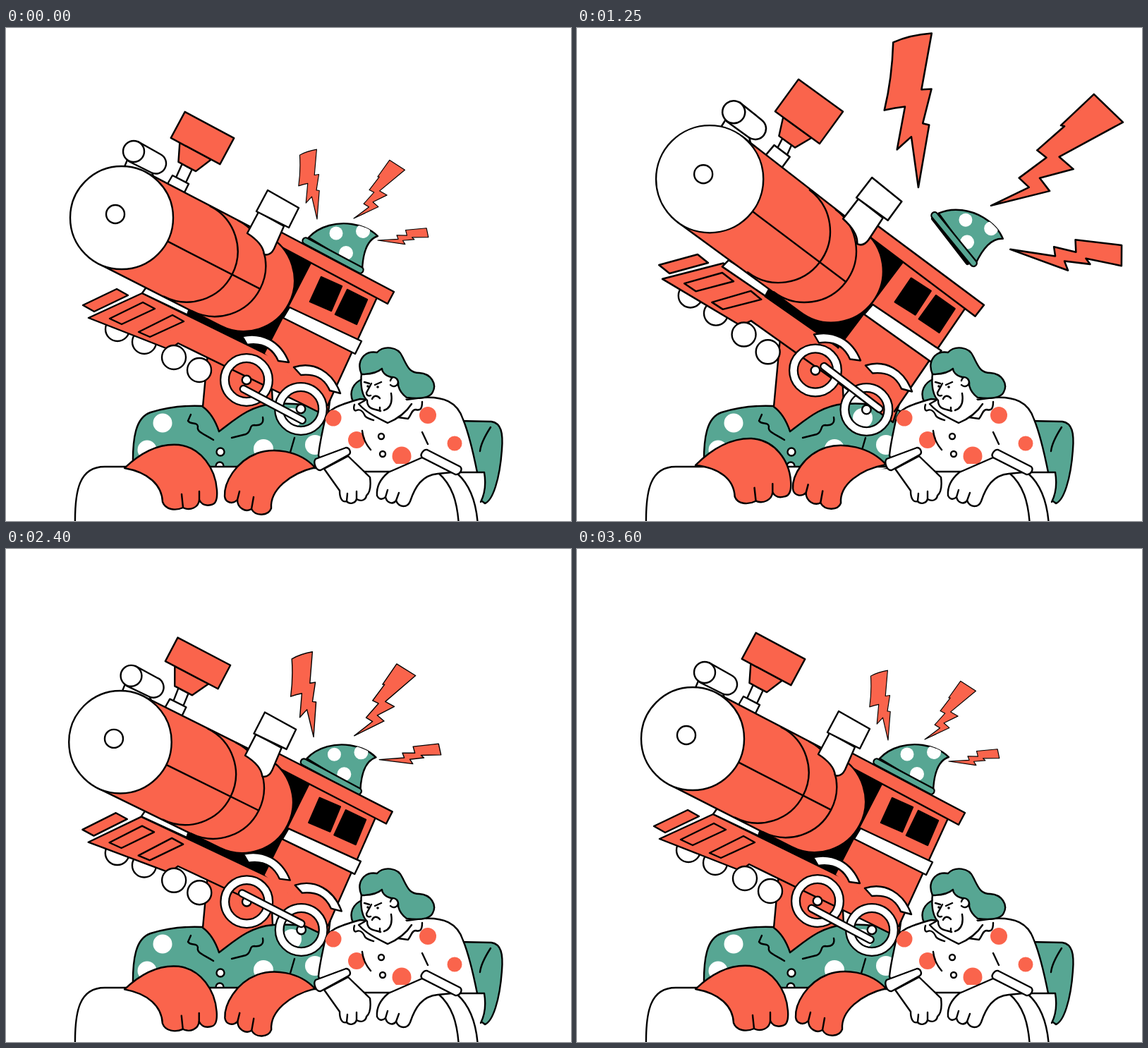
An HTML page for the animation above (3.65 s loop, 801x699 px).

```html
<!DOCTYPE html>
<html lang="en">
<head>
<meta charset="utf-8">
<title>Snoring engine</title>
<style>
html, body { margin: 0; width: 100%; height: 100%; overflow: hidden; background: #fff; }
svg { display: block; width: 801px; height: 699px; }
.ink { fill: none; stroke: #000; stroke-width: 2.4; stroke-linejoin: round; stroke-linecap: round; }
.red { fill: #fa644c; }
.teal { fill: #57a693; }
.white { fill: #fff; }
.black { fill: #000; }
.flat { stroke: none; }
</style>
</head>
<body>
<svg viewBox="0 0 801 699" class="ink">
  <defs>
    <clipPath id="shirtClip"><path d="M180,624C179,580 184,552 205,545C230,537 258,535 279,536L378,533C410,531 440,535 458,543L448,624Z"/></clipPath>
    <clipPath id="hatClip"><path d="M429,297C445,280 470,275 490,278C510,281 520,288 527,295C512,300 506,318 505,343Z"/></clipPath>
    <clipPath id="blouseClip"><path d="M452,556C447,580 444,592 443,606L455,618H662L640,530L590,524H500C470,535 456,540 452,556Z"/></clipPath>
  </defs>

  <g id="bolts"></g>

  <!-- pyjama shirt and neck -->
  <path class="teal" d="M180,624C179,580 184,552 205,545C230,537 258,535 279,536L378,533C410,531 440,535 458,543L448,624Z"/>
  <g class="white flat" clip-path="url(#shirtClip)">
    <circle cx="222" cy="560" r="13.5"/><circle cx="200" cy="598" r="13.5"/><circle cx="365" cy="597" r="14"/>
    <circle cx="405" cy="553" r="14"/><circle cx="438" cy="591" r="14"/>
  </g>
  <path d="M262,548L258,557C262,563 271,558 272,565C270,573 280,575 294,584M364,552C366,561 360,564 352,563C344,563 349,572 340,576L320,581M409,581L402,605"/>
  <circle class="white" cx="304" cy="601" r="5.5"/><circle class="white" cx="303" cy="621" r="5.5"/>
  <path class="red" d="M288,440L279,537C290,545 298,560 302,572C325,555 345,536 378,533L376,490Z"/>

  <!-- engine -->
  <g id="hat">
    <path stroke-width="6" d="M425,307L494,346"/>
    <path class="teal" d="M429,297C445,280 470,275 490,278C510,281 520,288 527,295C512,300 506,318 505,343Z"/>
    <g class="white flat" clip-path="url(#hatClip)">
      <circle cx="468" cy="291" r="9.5"/><circle cx="506" cy="288" r="10"/><circle cx="482" cy="319" r="10"/>
    </g>
    <path stroke-width="11.5" d="M425,302L502,343"/>
    <path stroke="#57a693" stroke-width="7" d="M425,302L502,343"/>
  </g>
  <g id="smallBack"></g>
  <g id="frame">
    <path class="red" d="M109,393L157,370L173,379L125,402Z"/>
    <path class="red" d="M117,411L193,376L366,461L462,508L456,551L416,531L244,447L232,456Z"/>
    <path d="M147,412L194,389L211,398L164,420ZM188,431L236,407L252,416L204,438Z"/>
  </g>
  <path class="white" id="tube"/><path class="red" id="cone"/><path class="red" id="box"/>
  <g id="cab">
    <path class="white" d="M193,376L200,366L266,394L258,407Z"/>
    <path class="black" d="M262,392L380,300L432,333L367,461L257,407Z"/>
    <path class="red flat" d="M432,333L526,382L456,535L366,461Z"/>
    <path d="M432,333L366,461M526,382L456,535"/>
    <path class="red" d="M389,289L550,374L541,391L380,305Z"/>
    <path class="white" d="M402,396L504,444L495,462L393,411Z"/>
    <path class="black" d="M447,353L476,366L461,401L431,388ZM484,371L512,385L497,420L467,406Z"/>
  </g>
  <g id="base"><path class="white" d="M236,209L259,221L249,241L226,226Z"/></g>
  <g id="whistle">
    <path class="white" d="M172,187L167,199L212,218L206,203Z"/>
    <path class="white" d="M187,161L219,179A14.5,14.5 0 0 1 206,205L174,189Z"/>
    <circle class="white" cx="181" cy="175" r="15"/>
  </g>
  <path class="red" id="boiler"/>
  <path id="seams"/>
  <circle class="white" id="face"/>
  <circle class="white" id="lamp" r="13"/>
  <g id="dome">
    <path class="white" d="M358,261L342,291C356,300 365,310 366,321C373,323 377,319 380,313L394,281Z"/>
    <path class="white" d="M371,230L415,255L401,283L355,260Z"/>
  </g>
  <g id="smallFront"></g>
  <g id="fenders">
    <path class="white" d="M335,437C362,431 389,443 401,474L386,472C377,452 362,446 342,449Z"/>
    <path class="white" d="M408,481C436,472 463,487 474,518L459,514C451,496 438,490 418,492Z"/>
  </g>
  <g id="wheels"></g>
  <path id="rodEdge" stroke-width="12"/>
  <path id="rod" stroke="#fff" stroke-width="7.4"/>

  <!-- cushion, blouse -->
  <path class="teal" d="M640,557L688,558C702,560 705,574 703,598C700,640 690,670 679,674L660,660Z"/>
  <path d="M687,566C678,580 673,590 672,600"/>
  <path class="teal" d="M507,497C491,503 486,517 492,530L520,532Z"/>
  <path class="white" d="M502,526C470,535 456,540 452,556C447,580 444,592 443,606L455,640H660L668,630C660,590 655,572 648,555C640,530 620,522 590,524L545,530Z"/>
  <g class="red flat" clip-path="url(#blouseClip)">
    <circle cx="464" cy="553" r="11.5"/><circle cx="497" cy="584" r="12"/><circle cx="598" cy="549" r="12"/>
    <circle cx="636" cy="589" r="10.5"/><circle cx="561" cy="607" r="13.5"/>
  </g>
  <circle class="white" cx="532" cy="579" r="4"/><circle class="white" cx="534" cy="604" r="4"/>
  <path d="M505,571C506,582 511,591 517,598M590,573L598,590"/>

  <!-- sofa -->
  <path class="white flat" d="M440,622L612,629H678C681,648 677,664 673,672L669,702H440Z"/>
  <path class="white" d="M98,706C97,655 104,622 140,622H446"/>
  <path class="white flat" d="M120,640H460V702H120Z"/>
  <path d="M505,629H545M612,630C633,648 640,672 642,706M640,632C658,648 667,672 669,706M645,630H678C681,648 678,662 673,672"/>

  <g id="armL">
    <path class="red" d="M168,624C195,598 222,589 245,591C277,595 297,625 299,655C300,668 298,675 291,676C283,678 277,675 274,669C273,680 261,685 251,680C240,685 226,683 222,672C221,648 202,630 168,624Z"/>
    <path d="M274,669V657M251,680L249,661"/>
  </g>
  <g id="armR">
    <path class="red" d="M438,623C415,598 378,595 356,603C325,615 309,645 310,664C311,673 321,676 328,669C328,681 340,687 348,682C354,693 372,692 376,681C374,655 402,632 438,623Z"/>
    <path d="M328,669L331,657M348,682L351,665"/>
  </g>

  <!-- woman's hands and head -->
  <path class="white" d="M451,625L473,656C473,666 476,673 483,671C487,676 495,674 497,668C504,672 510,669 511,663C518,657 517,645 516,637L485,607Z"/>
  <path d="M483,671L484,660M497,668L497,657"/>
  <path class="white" d="M590,609L542,630C530,640 525,652 526,663C529,669 534,669 538,665C540,674 549,676 553,670C557,680 569,681 573,671C580,650 590,634 612,632L632,630Z"/>
  <path d="M538,665L541,655M553,670L557,659"/>
  <path class="white" d="M439,611L482,595C487,595 490,602 486,605L446,627C439,628 435,615 439,611Z"/>
  <path class="white" d="M597,598L644,622C648,626 643,634 637,633L590,609C586,605 592,597 597,598Z"/>
  <path class="white flat" d="M508,485C500,505 505,522 511,529L503,533L541,560L573,533C560,522 557,512 556,505L540,485Z"/>
  <path d="M504,490C502,507 505,522 512,528C512,541 522,540 531,543M546,518C548,530 545,539 536,542M530,538V543"/>
  <path d="M509,528L500,533C510,545 527,553 541,560C553,555 566,547 575,533"/>
  <path d="M494,534C492,540 494,544 497,542C502,540 506,544 508,548C509,553 518,555 521,556M590,530C590,540 587,543 581,541C575,541 575,548 570,554L556,552"/>
  <path d="M508,502L515,504M523,506L532,502M518,504L511,517C511,522 515,522 517,521M519,526C521,521 526,520 530,525"/>
  <circle class="black flat" cx="513" cy="508" r="1.8"/><circle class="black flat" cx="527" cy="509" r="1.8"/>
  <path class="white" d="M545,500C547,492 557,493 556,501C556,508 549,510 545,506"/>
  <path class="teal" d="M504,491C496,472 508,457 526,460C535,450 556,451 562,466C569,480 572,489 586,489C603,490 611,505 605,516C601,525 585,526 568,524C560,518 557,512 556,506C557,498 552,494 546,495C537,493 533,487 533,483C525,490 512,491 504,491Z"/>
</svg>
<script>
const LOOP = 3650;
const $ = id => document.getElementById(id);

// Tracks: time, value pairs
const lift = [[0, 0], [400, -.1], [900, .47], [1100, .93], [1400, 1.08], [1600, 1], [1700, .88], [2050, -.15], [2850, 0], [LOOP, 0]];
const tuck = [[0, 0], [400, 1], [900, .25], [1400, 0], [LOOP, 0]];
const loud = [[0, 1], [400, .99], [900, 1.63], [1100, 2.11], [1400, 2.26], [1600, 2.19], [1700, 2.14], [2050, 1.49],
  [2400, 1.22], [2750, 1.63], [2850, 1.77], [2950, 1.84], [3350, 1.43], [3600, 1], [LOOP, 1]];
const hatUp = [[0, 0], [400, -.04], [900, .57], [1400, 1.06], [1600, 1], [2050, .3], [2450, 0], [LOOP, 0]];
const fenderUp = [[0, 0], [900, 0], [1600, 1], [2050, .8], [2850, 1], [3600, 0], [LOOP, 0]];
const boxTimes = [0, 400, 900, 1600, 2050, 2850, LOOP];
const boxTracks = {
  x: [278.5, 274, 299.5, 348, 267.5, 278.5, 278.5],
  y: [156, 163, 145, 100, 166, 156, 156],
  w: [79, 83.5, 90, 66, 88, 79, 79],
  h: [42, 39.5, 42, 69, 35, 42, 42],
  turn: [28.2, 27.5, 32.6, 38, 27.3, 28.2, 28.2]
};
for (const name in boxTracks) boxTracks[name] = boxTracks[name].map((v, i) => [boxTimes[i], v]);

// Smooth curve through the keys, flat at turning points
function at(keys, t) {
  let i = 0;
  while (i < keys.length - 2 && t >= keys[i + 1][0]) i++;
  const rate = n => keys[n] && keys[n + 1] ? (keys[n + 1][1] - keys[n][1]) / (keys[n + 1][0] - keys[n][0]) : 0;
  const slope = n => {
    const a = rate(n - 1), b = rate(n);
    return a * b > 0 ? 2 * a * b / (a + b) : 0;
  };
  const [t0, v0] = keys[i], [t1, v1] = keys[i + 1], d = t1 - t0, u = (t - t0) / d;
  const m = u * u * (3 - 2 * u);
  return v0 + (v1 - v0) * m + d * u * (1 - u) * (slope(i) * (1 - u) - slope(i + 1) * u);
}

// Linear displacement field around a pivot: [dx, dx/x, dx/y, dy, dy/x, dy/y]
function warp(px, py, f) {
  const [dx, ax, ay, dy, bx, by] = f;
  return [1 + ax, bx, ay, 1 + by, dx - ax * px - ay * py, dy - bx * px - by * py];
}
const apply = (m, x, y) => [m[0] * x + m[2] * y + m[4], m[1] * x + m[3] * y + m[5]];
const shift = (m, x, y) => [...m.slice(0, 4), m[4] + x, m[5] + y];
const setMatrix = (id, m) => $(id).setAttribute("transform", `matrix(${m.join()})`);
const setMove = (id, v) => $(id).setAttribute("transform", v);
const setPath = (id, d) => $(id).setAttribute("d", d);
const poly = pts => "M" + pts.map(p => p.join()).join("L") + "Z";

const FRONT = [23, .0527, -.1653, -53, .1725, .0419];
const TUCK = [10, -.022, -.0144, 6, -.0088, -.0058];
const CAB = [35, .0369, -.1758, -9, .1525, .0288];
const LOWER = [7, .044, -.19, -55, .171, .0215];

// Bolts: tip, drift with loudness, drift with lift, turn, outline from the tip
const bolts = [
  { tip: [441, 271], out: [-3.9, -26], up: [46, -13], turn: 5.1,
    d: "M-16.4,-92.7Q-6,-97.5 8.2,-98.6L1.8,-62.6L8.2,-63L2.7,-41L6.8,-40L0,0L-4.6,-32.4L-13.7,-24.2L-8.7,-51.6Q-15,-51 -21.9,-49.3Q-17,-70 -16.4,-92.7Z" },
  { tip: [493, 270], out: [27, -21], up: [59, 7], turn: 10.8,
    d: "M65.3,-71.7L84,-53.9L43.4,-31.5L52.5,-23.7L31,-17.8L37.4,-9.6L0,0L24.2,-11.9L17.8,-17.8L35.2,-31L29.2,-35.6L46.6,-51.1L44.3,-51.6Z" },
  { tip: [527, 301], out: [30, -4], up: [49, 17], turn: 11.4,
    d: "M0,0L28.8,4.1L27.9,-1.8L42,1.4L41.6,-6.4L71.2,-3.2V10L48.4,5.5L51.1,9.1L34.7,7.3L37,13.2Z" }
];
$("bolts").innerHTML = bolts.map(b => `<path class="red" stroke-width="1.15" d="${b.d}"/>`).join("");

const circle = r => `<circle class="white" r="${r}"/>`;
$("smallBack").innerHTML = $("smallFront").innerHTML = circle(17).repeat(2);
const ring = '<g><circle r="31" stroke-width="14"/><circle r="31" stroke="#fff" stroke-width="9.5"/>' + circle(6.3) + "</g>";
$("wheels").innerHTML = ring.repeat(2);
const hubs = [[341, 499], [418, 540]];

function place(id, points, m) {
  points.forEach(([x, y], i) =>
    $(id).children[i].setAttribute("transform", `translate(${apply(m, x, y)})`));
}

function drawStack(t, m) {
  const b = {};
  for (const name in boxTracks) b[name] = at(boxTracks[name], t);
  const a = b.turn * Math.PI / 180, c = Math.cos(a), s = Math.sin(a);
  const p = (x, y) => [b.x + x * c - y * s, b.y + x * s + y * c];
  const w = b.w / 2, h = b.h / 2, low = h + 25;
  setPath("box", poly([p(-w, -h), p(w, -h), p(w, h), p(-w, h)]));
  setPath("cone", poly([p(-w * .64, h), p(w * .64, h), p(14, low), p(-14, low)]));
  setPath("tube", poly([p(-8, low), p(8, low), apply(m, 255, 219), apply(m, 241, 212)]));
}

// Cylinder along an axis from the round face to the rear end
function drawBoiler(k, j) {
  const x = 164 + 23 * k + 10 * j, y = 269 - 53 * k + 6 * j;
  const dx = 337 + 23 * k - x, dy = 358 - 13 * k - y;
  const len = Math.hypot(dx, dy), c = dx / len, s = dy / len;
  const r = 73 + 3 * k - j, R = 72 + k;
  const p = (along, side) => [x + along * c - side * s, y + along * s + side * c];
  const half = along => `${p(along, -R)}A${R},${R} 0 0 1 ${p(along, R)}`;
  const first = len * (.535 + .03 * k), second = len * (.764 + .016 * k);
  setPath("boiler", `M${p(0, -r)}L${half(len)}L${p(0, r)}Z`);
  setPath("seams", `M${half(first)}M${half(second)}M${p(r, 0)}L${p(second + R, 0)}`);
  $("face").setAttribute("r", r);
  setMove("face", `translate(${x},${y})`);
  setMove("lamp", `translate(${x - 9},${y - 5 - 2 * k})`);
}

function draw(t) {
  const k = at(lift, t), j = at(tuck, t), s = at(loud, t), h = at(hatUp, t), f = at(fenderUp, t);
  const front = warp(164, 269, FRONT.map((v, i) => v * k + TUCK[i] * j));
  const fittings = shift(front, 5 * k, 1.5 * k);
  const cab = warp(389, 289, CAB.map(v => v * k));
  const lower = warp(109, 393, LOWER.map(v => v * k));
  setMatrix("whistle", front);
  setMatrix("base", fittings);
  setMatrix("dome", fittings);
  setMatrix("cab", shift(cab, 0, 2 * j));
  setMatrix("frame", lower);
  drawBoiler(k, j);
  drawStack(t, fittings);

  setMove("hat", `translate(${33 * k + 37.5 * h},${-4 * k - 19 * h + 2 * j}) rotate(${23 * h},463.5,322)`);
  setMove("fenders", `translate(${2 * f},${-5 * f})`);
  place("smallBack", [[158, 427], [196, 445]], lower);
  place("smallFront", [[238, 467], [274, 485]], lower);
  place("wheels", hubs, lower);

  const [a, b] = hubs.map(p => apply(lower, ...p));
  const turn = (109 - 360 * 4 * t / LOOP) * Math.PI / 180;
  const x = a[0] + 13.5 * Math.cos(turn), y = a[1] + 13.5 * Math.sin(turn);
  const line = `M${x},${y}l${(b[0] - a[0]) * 1.08},${(b[1] - a[1]) * 1.08}`;
  setPath("rod", line);
  setPath("rodEdge", line);

  setMatrix("armL", warp(168, 624, [0, .03 * k, 0, -4 * k, -.06 * k, 0]));
  setMatrix("armR", warp(438, 623, [0, .03 * k, 0, -4 * k, .05 * k, 0]));

  bolts.forEach(({ tip, out, up, turn }, i) => {
    const [bx, by] = tip.map((v, n) => v + out[n] * (s - 1) + up[n] * k);
    $("bolts").children[i].setAttribute("transform",
      `translate(${bx},${by + 4 * j}) rotate(${turn * (k - 1)}) scale(${s})`);
  });
}

const start = performance.now();
function tick() {
  draw((performance.now() - start) % LOOP);
  requestAnimationFrame(tick);
}
tick();
</script>
</body>
</html>
```
